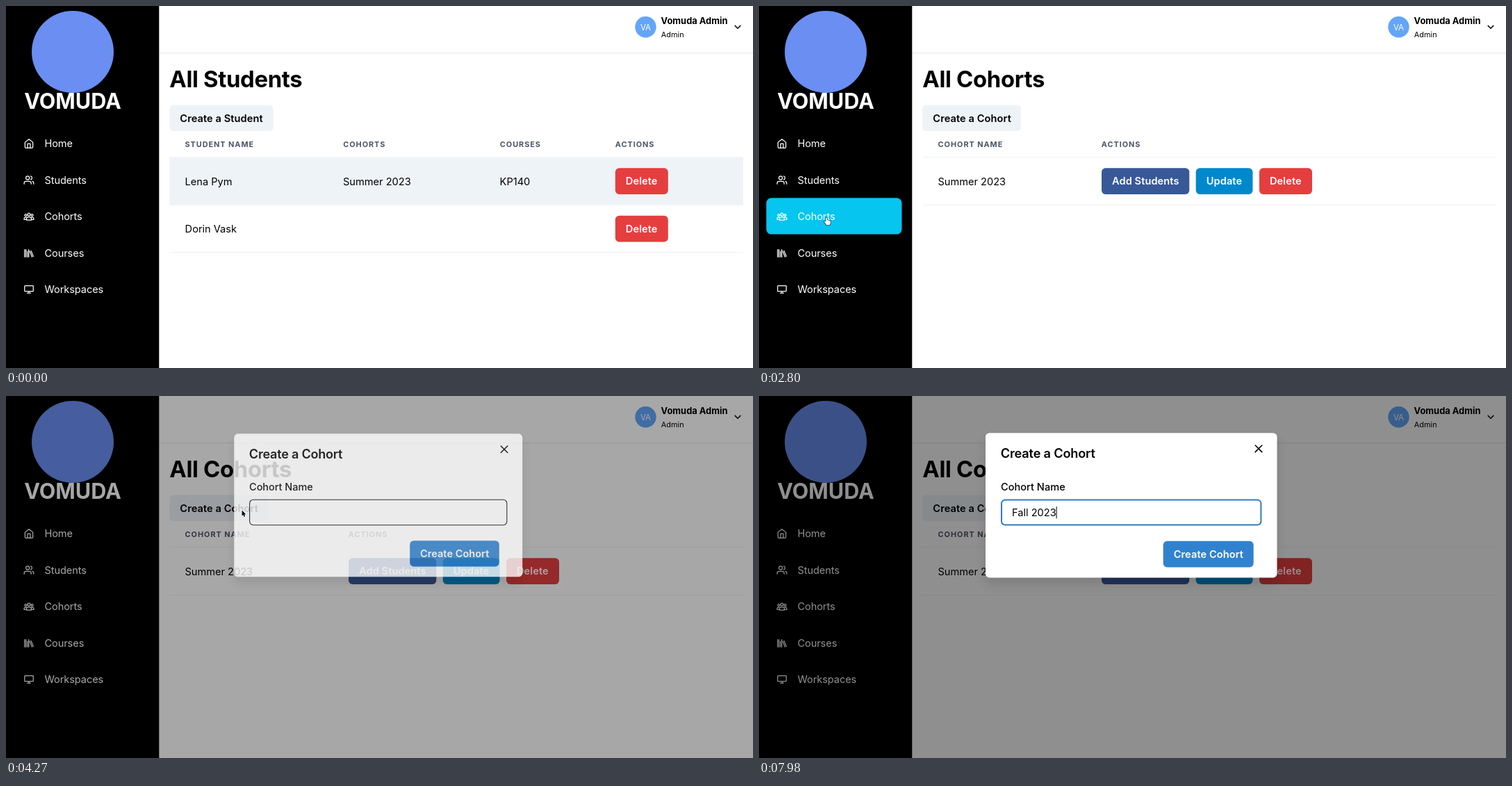
Write an HTML page with a canvas that moves like this. It is 1075x521 px and loops after 8 s.

```html
<!DOCTYPE html>
<html lang="en">
<head>
<meta charset="utf-8">
<title>Cohort admin</title>
<style>
  html, body { margin: 0; width: 100%; height: 100%; overflow: hidden; background: #fff; }
  canvas { display: block; width: 1075px; height: 521px; }
</style>
</head>
<body>
<canvas id="stage"></canvas>
<script>
const W = 1075, H = 521, LOOP = 8000, STEP = 70;
const FONT = 'Inter, "Open Sans", sans-serif';
const BODY = 14.6;
const dpr = window.devicePixelRatio || 1;

const stage = document.getElementById('stage');
const layer = document.createElement('canvas');
for (const c of [stage, layer]) {
  c.width = W * dpr;
  c.height = H * dpr;
}
const main = stage.getContext('2d');
const sheet = layer.getContext('2d');
let g = main;

const clamp = v => Math.max(0, Math.min(1, v));
const ramp = (t, from, to) => clamp((t - from) / (to - from));
const smooth = k => k * k * (3 - 2 * k);
const mix = (a, b, k) => a + (b - a) * k;
const mixRgb = (a, b, k) => `rgb(${a.map((v, i) => Math.round(mix(v, b[i], k)))})`;

function box(x, y, w, h, r, fill) {
  g.beginPath();
  g.roundRect(x, y, w, h, r);
  g.fillStyle = fill;
  g.fill();
}

function disc(x, y, r, fill) {
  g.beginPath();
  g.arc(x, y, r, 0, Math.PI * 2);
  g.fillStyle = fill;
  g.fill();
}

// y is the middle of the capitals
function text(str, x, y, { size = BODY, weight = 400, color = '#000', gap = 0, align = 'left' } = {}) {
  g.font = `${weight} ${size}px ${FONT}`;
  g.letterSpacing = gap + 'px';
  g.textAlign = align;
  g.fillStyle = color;
  g.fillText(str, x, y + size * 0.363);
}

function button(label, x, y, w, fill, color = '#fff') {
  box(x, y, w, 37.6, 5.6, fill);
  text(label, x + 15, y + 18.9, { weight: 600, color, gap: 0.08 });
}

function stroke(points, color, width) {
  g.beginPath();
  points.forEach(([x, y]) => g.lineTo(x, y));
  g.strokeStyle = color;
  g.lineWidth = width;
  g.lineCap = g.lineJoin = 'round';
  g.stroke();
}

// Sidebar icons on a 24 unit grid
const MENU = [
  ['Home', 'M3 9l9-7 9 7v11a2 2 0 0 1-2 2H5a2 2 0 0 1-2-2z M9 22V12h6v10'],
  ['Students', 'M17 21v-2a4 4 0 0 0-4-4H5a4 4 0 0 0-4 4v2 M13 7a4 4 0 1 1-8 0a4 4 0 1 1 8 0 M23 21v-2a4 4 0 0 0-3-3.9 M16 3.1a4 4 0 0 1 0 7.8'],
  ['Cohorts', 'M15 7a3 3 0 1 1-6 0a3 3 0 1 1 6 0 M7 9a2.3 2.3 0 1 1-4.6 0a2.3 2.3 0 1 1 4.6 0 M21.6 9a2.3 2.3 0 1 1-4.6 0a2.3 2.3 0 1 1 4.6 0 M6.5 20v-3a5.5 4 0 0 1 11 0v3z M6 14H3a2 2 0 0 0-2 2v3h5 M18 14h3a2 2 0 0 1 2 2v3h-5'],
  ['Courses', 'M2 4v17 M5 4v17 M8.5 8v13 M11.5 4v17 M14 8l5 13 M17 7l5 13'],
  ['Workspaces', 'M3 3.5h18a1 1 0 0 1 1 1V15a1 1 0 0 1-1 1H3a1 1 0 0 1-1-1V4.500a1 1 0 0 1 1-1z M12 16v4 M8 20h8']
].map(([label, d]) => ({ label, icon: new Path2D(d) }));

function sidebar(glow) {
  box(0, 0, 220.3, H, 0, '#000');
  disc(96, 66, 59, '#6a8ef2');
  text('VOMUDA', 96, 136.8, { size: 30.6, weight: 700, color: '#fff', align: 'center' });
  if (glow > 0) box(10.5, 276.3, 195, 52.3, 7.5, `rgba(6,197,238,${glow})`);
  MENU.forEach(({ label, icon }, i) => {
    const y = 198 + i * 52.5;
    g.save();
    g.translate(33 - 7.5, y - 7.5);
    g.scale(0.625, 0.625);
    g.strokeStyle = '#fff';
    g.lineWidth = 2;
    g.lineCap = g.lineJoin = 'round';
    g.stroke(icon);
    g.restore();
    text(label, 55.4, y, { color: '#fff', gap: -0.08 });
  });
}

function header() {
  box(220.3, 67.2, W - 220.3, 1, 0, '#e2e4e8');
  disc(920.5, 30.3, 15.2, '#63a5fa');
  text('VA', 920.5, 30.6, { size: 11.6, color: '#fff', align: 'center' });
  text('Vomuda Admin', 942.6, 21.5, { size: 12.9, weight: 700 });
  text('Admin', 942.8, 41, { size: 10.9 });
  stroke([[1049.2, 28.4], [1053, 32.2], [1056.8, 28.4]], '#111', 1.6);
}

function columns(list) {
  list.forEach(([label, x]) =>
    text(label, x, 198.7, { size: 10.9, weight: 700, color: '#4a5568', gap: 0.95 }));
}

const rule = y => box(235.3, y, 825.7, 1, 0, '#edf1f5');
const title = str => text(str, 235.2, 104.6, { size: 32.8, weight: 700, gap: -0.3 });

function studentsPage() {
  title('All Students');
  button('Create a Student', 235.3, 142.4, 149.3, '#eef3f8', '#000');
  columns([['STUDENT NAME', 257.6], ['COHORTS', 485.2], ['COURSES', 710.8], ['ACTIONS', 876.8]]);
  box(235.3, 217.5, 825.7, 69.2, 0, '#eef3f8');
  rule(354);
  text('Lena Pym', 257.6, 252.6);
  text('Summer 2023', 485, 252.6);
  text('KP140', 710.6, 252.6);
  text('Dorin Vask', 257.6, 321);
  button('Delete', 876.8, 233.3, 76, '#e53e3e');
  button('Delete', 876.8, 301.8, 76, '#e53e3e');
}

function cohortsPage(hover) {
  title('All Cohorts');
  button('Create a Cohort', 235.3, 142.4, 141.8, mixRgb([238, 243, 248], [226, 232, 240], hover), '#000');
  columns([['COHORT NAME', 257.6], ['ACTIONS', 492.8]]);
  rule(217.3);
  rule(286);
  text('Summer 2023', 257.4, 252.6);
  button('Add Students', 493, 233.3, 126.3, '#385898');
  button('Update', 628.7, 233.3, 81.8, '#0088cc');
  button('Delete', 720, 233.3, 76, '#e53e3e');
}

const WORD = 'Fall 2023';
const KEYS = [6300, 6510, 6650, 6790, 7140, 7420, 7490, 7630, 7700];

function dialog(t) {
  const CX = 535.7, CY = 157.3;
  const k = ramp(t, 3814, 4673);
  const shown = 1 - (1 - k) ** 2;
  const focus = ramp(t, 4830, 5110);
  if (shown === 0) return;

  box(0, 0, W, H, 0, `rgba(0,0,0,${0.44 * shown})`);

  g = sheet;
  g.setTransform(dpr, 0, 0, dpr, 0, 0);
  g.clearRect(0, 0, W, H);
  const zoom = 0.95 + 0.05 * shown;
  g.translate(CX, CY);
  g.scale(zoom, zoom);
  g.translate(-CX, -CY);

  g.shadowColor = 'rgba(0,0,0,0.12)';
  g.shadowBlur = 15 * dpr;
  g.shadowOffsetY = 9 * dpr;
  box(326, 53.2, 419.5, 208.3, 5.6, '#fff');
  g.shadowColor = 'transparent';

  text('Create a Cohort', 347.8, 82.8, { size: 18.2, weight: 600, gap: -0.2 });
  text('Cohort Name', 348, 130.6, { weight: 500 });
  stroke([[714.2, 71], [723.8, 80.6]], '#000', 1.6);
  stroke([[723.8, 71], [714.2, 80.6]], '#000', 1.6);

  const line = mix(1.1, 2, focus);
  g.beginPath();
  g.roundRect(348 + line / 2, 148.6 + line / 2, 375.4 - line, 38 - line, 5.2);
  g.strokeStyle = mixRgb([20, 20, 20], [49, 122, 192], focus);
  g.lineWidth = line;
  g.stroke();

  const typed = WORD.slice(0, KEYS.filter(key => t >= key).length);
  text(typed, 364, 168);
  const caretOn = t >= 4900 && !(t >= 5250 && t < 5810);
  if (caretOn) box(364 + g.measureText(typed).width, 159, 1, 17.2, 0, '#000');

  button('Create Cohort', 581.7, 208.8, 130, '#3182ce');

  g = main;
  g.save();
  g.setTransform(1, 0, 0, 1, 0, 0);
  g.globalAlpha = shown;
  g.drawImage(layer, 0, 0);
  g.restore();
}

// Pointer stops: time, x, y of the tip
const PATH = [
  [560, 506, 512], [1050, 150, 322], [1190, 150, 322], [1400, 102.5, 302.5],
  [1540, 102.5, 302.5], [1890, 146, 306], [1960, 146, 306], [2100, 97.2, 304.4],
  [2800, 97.2, 304.4], [3360, 540, 244], [3640, 290, 160], [3780, 289, 161.5],
  [4130, 289, 161.5], [4270, 339.6, 164.6], [4550, 425, 168.6], [6300, 425, 168.6]
];
const ARROW = new Path2D('M0 0V14l3.2-3 2.2 5 2.4-1-2.2-4.9H10z');
const HAND = new Path2D('M-1.4 8.6V1.4a1.4 1.4 0 0 1 2.8 0V5.6l1.3-.3 1.2.7 1.3 0 1 .8 1.2.2.6 1v3.5l-1.5 4H.1L-4.7 9.2a1.3 1.3 0 0 1 2-1.5z');

function pointerAt(t) {
  const i = PATH.findIndex(stop => stop[0] > t);
  if (i < 1) return null;
  const [t0, x0, y0] = PATH[i - 1], [t1, x1, y1] = PATH[i];
  const k = smooth(ramp(t, t0, t1));
  return [mix(x0, x1, k), mix(y0, y1, k)];
}

function pointer(t) {
  const at = pointerAt(t);
  if (!at) return;
  const [x, y] = at;
  if (t > 4270 && x > 349) {
    for (const [color, width] of [['rgba(255,255,255,.8)', 2.2], ['#111', 1]]) {
      stroke([[x - 2, y - 4.8], [x, y - 4], [x + 2, y - 4.8]], color, width);
      stroke([[x, y - 4], [x, y + 4]], color, width);
      stroke([[x - 2, y + 4.8], [x, y + 4], [x + 2, y + 4.8]], color, width);
    }
    return;
  }
  const onMenu = t >= 2170 && x < 206;
  const onButton = t >= 3570 && t < 3990;
  const hand = onMenu || onButton;
  const size = hand ? 0.7 : 0.58;
  const shape = hand ? HAND : ARROW;
  g.save();
  g.translate(x, y);
  g.scale(size, size);
  g.lineJoin = 'round';
  g.lineWidth = hand ? 1.5 : 2.6;
  g.strokeStyle = hand ? '#000' : '#fff';
  g.fillStyle = hand ? '#fff' : '#000';
  g.stroke(shape);
  g.fill(shape);
  g.restore();
}

function draw(t) {
  g = main;
  g.setTransform(dpr, 0, 0, dpr, 0, 0);
  box(0, 0, W, H, 0, '#fff');
  header();
  if (t < 2590) studentsPage();
  else cohortsPage(ramp(t, 3500, 3640) * (1 - ramp(t, 4130, 4340)));
  sidebar(ramp(t, 2170, 2380) * (1 - ramp(t, 3010, 3220)));
  dialog(t);
  pointer(t);
}

const start = performance.now();
function frame() {
  const t = (performance.now() - start) % LOOP;
  draw(Math.floor(t / STEP) * STEP);
  requestAnimationFrame(frame);
}
frame();
</script>
</body>
</html>
```
